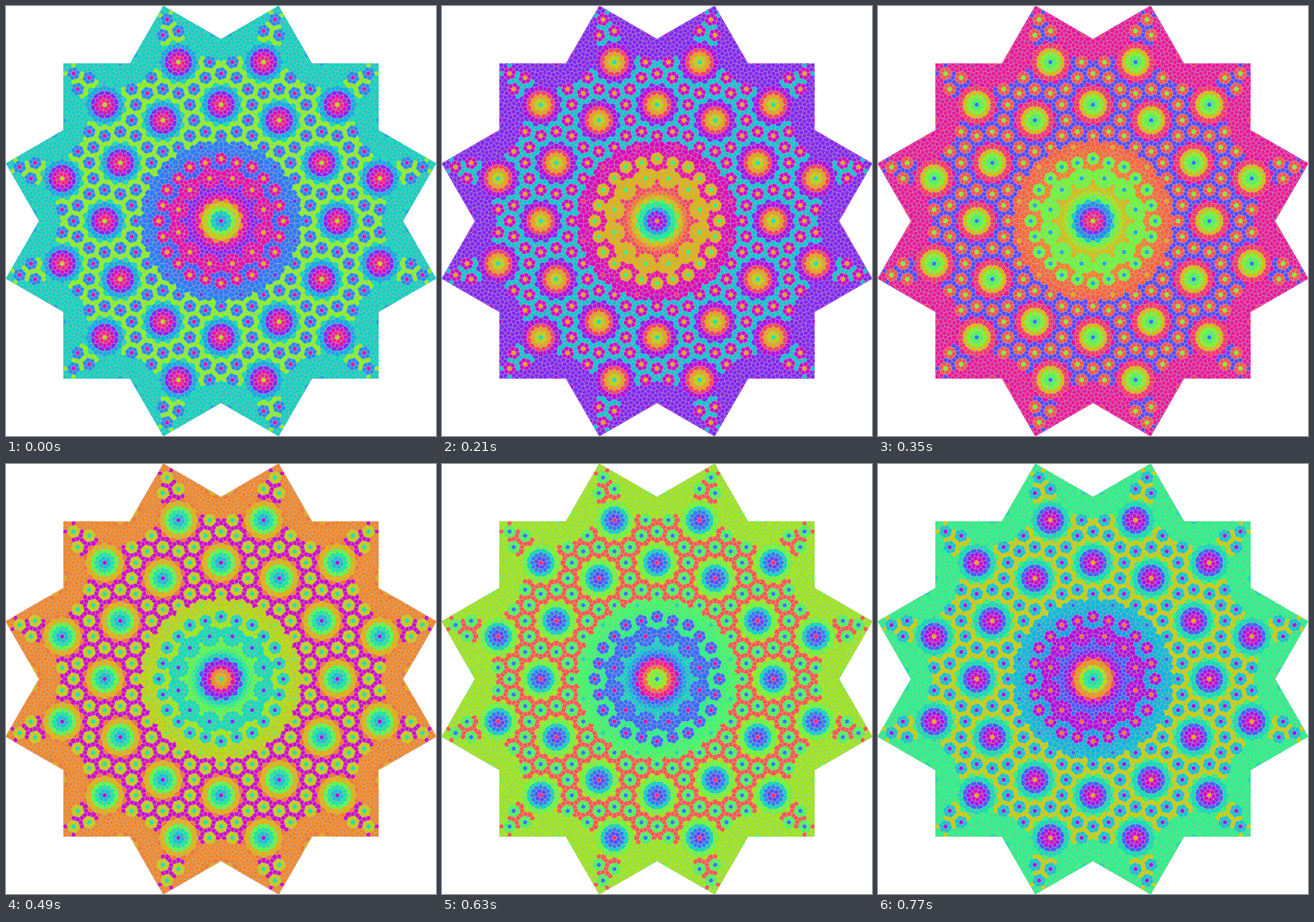
Animation, 600 px wide and 600 px high, one loop 0.84 s. Source, as an HTML page with a canvas:

```html
<!DOCTYPE html>
<html>
<head>
<meta charset="utf-8">
<style>
html, body { margin: 0; background: #fff; overflow: hidden; }
canvas { display: block; width: 600px; height: 600px; }
</style>
</head>
<body>
<canvas id="stage" width="600" height="600"></canvas>
<script>
const ctx = document.getElementById('stage').getContext('2d');
const RAD = Math.PI / 180, LAMBDA = 2 + Math.sqrt(3);
const HALF = 220;                       // half side of the three squares forming the star
const BIG = 84, MID = BIG / LAMBDA, SMALL = MID / LAMBDA;
const WHEEL = 1 / (2 * Math.sin(15 * RAD)); // circumradius of a unit dodecagon
const APEX = 1 + Math.sqrt(3);

const dist = (a, b) => Math.hypot(a.x - b.x, a.y - b.y);
const near = (list, p, r) => list.find(c => dist(c, p) < r);
const ring = (r, from = 0, c = { x: 0, y: 0 }, count = 12) =>
  Array.from({ length: count }, (_, k) => {
    const a = (from + k * 360 / count) * RAD;
    return { x: c.x + r * Math.cos(a), y: c.y + r * Math.sin(a) };
  });

// Distance measure of the star: below HALF is inside
const starDepth = p => Math.min(...[0, 30, 60].map(d => {
  const c = Math.cos(d * RAD), s = Math.sin(d * RAD);
  return Math.max(Math.abs(p.x * c + p.y * s), Math.abs(p.y * c - p.x * s));
}));

function addUnique(list, items, gap) {
  for (const p of items) {
    if (starDepth(p) < HALF + 20 && !near(list, p, gap)) list.push(p);
  }
}

// Rose centres, then flower centres between them
const origin = { x: 0, y: 0 };
const notches = ring(BIG * (WHEEL + Math.SQRT2));
const roses = [
  ...ring(BIG * WHEEL),
  ...ring(BIG * (WHEEL * Math.cos(15 * RAD) + Math.sqrt(3) / 2), 15),
  ...notches
];
const flowers = [];
for (const c of roses) addUnique(flowers, ring(MID * WHEEL, 0, c), 5);
addUnique(flowers, [...ring(291, 15), ...ring(291.5, 10.6), ...ring(291.5, 19.4), ...ring(313, 15)], 5);
const rimFlowers = flowers.filter(f => starDepth(f) > HALF - 5 || near(notches, f, 44));
const wideFlowers = ring(MID * APEX, 15);
const innerFlowers = [...wideFlowers, ...ring(BIG, 15), ...ring(MID * WHEEL * 2)];
const spots = ring(BIG + MID, 15);
const wheels = [...flowers, ...innerFlowers, ...spots, ...ring(MID * WHEEL)];

// Cell centres
const points = [];
const hubs = [origin, ...roses];
addUnique(points, [...hubs, ...wheels], 4);
for (const c of hubs) {
  addUnique(points, [
    ...ring(SMALL, 15, c, 6), ...ring(SMALL * WHEEL, 0, c), ...ring(SMALL * APEX, 15, c),
    ...ring(MID, 15, c), ...ring(SMALL * WHEEL * 2, 0, c), ...ring(MID + SMALL, 15, c)
  ], 4);
}
for (const c of wheels) {
  const sector = Math.floor(Math.atan2(c.y, c.x) / RAD / 30 + 1e-6);
  addUnique(points, ring(SMALL, 15 + 30 * sector, c, 6), 4);
}
for (const c of wheels) addUnique(points, ring(SMALL * WHEEL, 0, c), 4);

// Piecewise linear hue profiles over the distance from a centre
const GROUND = 94;
const roseHue = [[0, 430], [6, 335], [11.7, 308], [16.5, 262], [22.5, 200], [28.5, 168], [31, 165]];
const coreHue = [[0, 660], [6, 555], [11.7, 535], [16.5, 465], [22.5, 425],
  [28.5, 390], [31.8, 330], [36, 305], [44, 268], [80, 230], [114, 215]];
function profile(stops, r) {
  const i = Math.max(1, stops.findIndex(s => s[0] >= r));
  const [r0, h0] = stops[i - 1], [r1, h1] = stops[i];
  return h0 + (h1 - h0) * (r - r0) / (r1 - r0);
}

function hueOf(p) {
  const r = Math.hypot(p.x, p.y);
  const rose = near(roses, p, 30.5);
  if (rose) return profile(roseHue, dist(rose, p));
  const inner = near(wideFlowers, p, 12) || near(innerFlowers, p, 7);
  if (inner) return dist(inner, p) < 2 ? 405 : 317;
  if (near(rimFlowers, p, 12)) return 175;
  const flower = near(flowers, p, 7);
  if (flower) return dist(flower, p) < 2 ? 310 : 212;
  if (near(spots, p, 2)) return 255;
  return r < 113 ? profile(coreHue, r) : GROUND;
}

// Voronoi cell: a box cut by the bisector towards each close neighbour
function cellOf(p) {
  let poly = [[-9, -9], [9, -9], [9, 9], [-9, 9]];
  for (const q of points) {
    const dx = q.x - p.x, dy = q.y - p.y;
    if (q === p || Math.abs(dx) > 18 || Math.abs(dy) > 18) continue;
    const half = (dx * dx + dy * dy) / 2;
    const side = v => v[0] * dx + v[1] * dy - half;
    poly = poly.flatMap((a, i) => {
      const b = poly[(i + 1) % poly.length], sa = side(a), sb = side(b);
      const out = sa <= 0 ? [a] : [];
      if (sa * sb < 0) {
        const t = sa / (sa - sb);
        out.push([a[0] + (b[0] - a[0]) * t, a[1] + (b[1] - a[1]) * t]);
      }
      return out;
    });
  }
  const path = new Path2D();
  poly.forEach(([x, y]) => path.lineTo(p.x + x, p.y + y));
  path.closePath();
  return path;
}

const seams = new Path2D();
const cells = points.map(p => {
  const path = cellOf(p);
  seams.addPath(path);
  return { path, hue: hueOf(p) };
});

// Rainbow of three shifted cosines
function colour(hue) {
  const channel = shift => {
    const s = (1 + Math.cos((hue - shift) * RAD)) / 2;
    return Math.round(12 + 243 * s * (1.2 - 0.2 * s));
  };
  return `rgb(${channel(0)},${channel(120)},${channel(240)})`;
}

ctx.translate(300, 300);
const star = new Path2D();
for (const d of [0, 30, 60]) {
  ring(HALF * Math.SQRT2, 45 + d, origin, 4).forEach((p, i) => i ? star.lineTo(p.x, p.y) : star.moveTo(p.x, p.y));
  star.closePath();
}
ctx.clip(star);
ctx.lineWidth = 0.7;
ctx.strokeStyle = 'rgba(165,165,165,0.5)';

let shown = -1;
function draw() {
  const step = Math.floor(performance.now() % 840 / 70);
  if (step !== shown) {
    shown = step;
    ctx.fillStyle = '#fff';
    ctx.fillRect(-300, -300, 600, 600);
    for (const c of cells) {
      ctx.fillStyle = colour(c.hue + 30 * step);
      ctx.fill(c.path);
    }
    ctx.stroke(seams);
  }
  requestAnimationFrame(draw);
}
draw();
</script>
</body>
</html>
```
